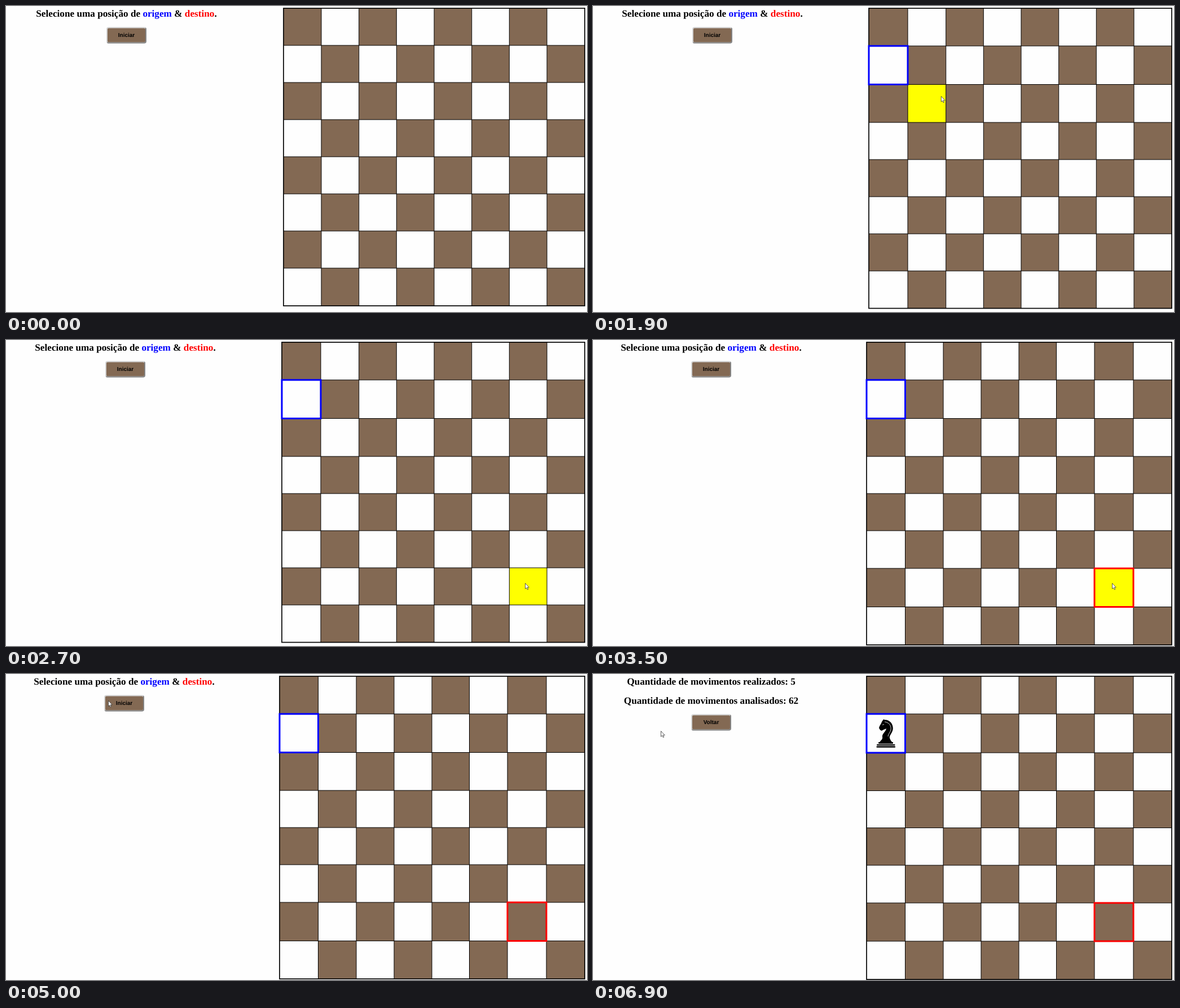
Animation of 1030x544 px, one loop 8 s. Source, as an HTML page:

```html
<!DOCTYPE html>
<html lang="pt">
<head>
<meta charset="utf-8">
<style>
  html, body { margin: 0; width: 100%; height: 100%; overflow: hidden; background: #fefefe; }
  svg { display: block; width: 1030px; height: 544px; }
  .title { font: bold 17.2px "Liberation Serif", "Times New Roman", serif; text-anchor: middle; white-space: pre; }
  .label { font: bold 10px "Liberation Sans", Arial, sans-serif; text-anchor: middle; }
  text { text-rendering: geometricPrecision; }
</style>
</head>
<body>
<svg id="stage" viewBox="0 0 1030 544"></svg>
<script>
const LOOP = 8000, STEP = 100;
const BROWN = '#836953', WHITE = '#fefefe';

// Grid lines of the board; selected cells have thicker borders and push the others.
const right = [625.7, 692.3, 759, 825.7, 892.3, 959, 1026];
const wide = [485, 553.5, 621, 688, 755, 821.5, 889, 958, 1026];
const layouts = [
  { from: 0, cx: 213.5, xs: [492, 559, ...right], ys: [4, 70, 136, 202, 268, 334, 400, 466, 533] },
  { from: 1700, cx: 211.5, xs: [489, 558, ...right], ys: [4, 71, 139.5, 207, 273, 339, 405, 471, 537.5] },
  { from: 3500, cx: 209.5, xs: wide, ys: [4, 71, 139.5, 207, 273, 339, 406, 474.5, 542] },
  { from: 5600, cx: 209.5, xs: wide, ys: [4, 71, 140, 207.5, 273.5, 340, 407, 475, 543] }
];

const linear = k => k;
const easeOut = k => 1 - (1 - k) ** 2;
const smooth = k => k * k * (3 - 2 * k);

// Mouse moves: start time, number of steps, end point, easing.
const start = [13, -11.6];
const moves = [
  [300, 2, 471.5, 114.5, linear],
  [600, 3, 551, 83.5, easeOut],
  [1100, 3, 530.5, 88.5, easeOut],
  [1900, 4, 877.5, 376.5, linear],
  [2300, 5, 920.5, 432.5, easeOut],
  [3800, 3, 415.5, 186.5, easeOut],
  [4400, 7, 181.5, 47.5, smooth],
  [6500, 5, 120.5, 101.5, smooth]
];

function mouseAt(t) {
  let [x, y] = start;
  for (const [from, steps, tx, ty, ease] of moves) {
    if (t < from) break;
    const k = ease(Math.min(1, ((t - from) / STEP + 1) / steps));
    x += (tx - x) * k;
    y += (ty - y) * k;
  }
  return [x, y];
}

const rect = (x, y, w, h, attrs) => `<rect x="${x}" y="${y}" width="${w}" height="${h}" ${attrs}/>`;
const path = (d, attrs) => `<path d="${d}" ${attrs}/>`;
const title = (x, y, s) => `<text class="title" x="${x}" y="${y}">${s}</text>`;

function board({ xs, ys }, mx, my) {
  let cells = '', lines = '';
  for (let r = 0; r < 8; r++) {
    for (let c = 0; c < 8; c++) {
      const x = xs[c], y = ys[r], w = xs[c + 1] - x, h = ys[r + 1] - y;
      const hover = mx >= x && mx < x + w && my >= y && my < y + h;
      cells += rect(x, y, w, h, `fill="${hover ? '#ff0' : (r + c) % 2 ? WHITE : BROWN}"`);
    }
  }
  for (let i = 1; i < 8; i++) {
    lines += `M${xs[i]} ${ys[0]}V${ys[8]}M${xs[0]} ${ys[i]}H${xs[8]}`;
  }
  return cells + path(lines, 'stroke="#000"') +
    rect(xs[0], ys[0], xs[8] - xs[0], ys[8] - ys[0], 'fill="none" stroke="#000" stroke-width="1.7"');
}

function mark({ xs, ys }, c, r, color) {
  return rect(xs[c], ys[r], xs[c + 1] - xs[c], ys[r + 1] - ys[r],
    `fill="none" stroke="${color}" stroke-width="3"`);
}

function button(cx, y, label, pressed) {
  const l = cx - 34.5, r = cx + 34.5, b = y + 27;
  const [lit, dark] = pressed ? ['#858585', '#d2d2d2'] : ['#d2d2d2', '#858585'];
  return rect(l, y, 69, 27, `rx="3" fill="${BROWN}" stroke="${lit}" stroke-width="2"`) +
    path(`M${r - 1} ${y + 1}Q${r} ${y + 1} ${r} ${y + 3}V${b - 3}Q${r} ${b} ${r - 3} ${b}H${l + 3}Q${l + 1} ${b} ${l + 1} ${b - 1}`,
      `fill="none" stroke="${dark}" stroke-width="2"`) +
    `<text class="label" x="${cx}" y="${y + 16}">${label}</text>`;
}

function knight() {
  return path('M508 122C509 118 514 117 513 112C512 106 519 103 520 97C517 99 515 98 512 101L509 99.5L507 96C508 91 511 89 512 85L515 80.5L517 81.5C527 81 533 90 531.5 99C530 106 525 109 526 114Q527 118 531 122Z', '') +
    path('M517 85C525 86 529 92 528 99C527 104 523 107 523 111M513 90.5L516 89.5', `fill="none" stroke="${WHITE}" stroke-width=".8"`) +
    rect(506, 121, 26, 3, 'rx="1"') + rect(503, 125, 32.5, 2.2, 'rx="1"') + rect(502.5, 128.2, 33.5, 2.6, 'rx="1"');
}

function cursor(x, y) {
  return path(`M${x} ${y}v9.8l2.2-1.9 1.6 3.4 1.5-.7-1.6-3.3h3.1z`,
    'fill="#fff" stroke="#333" stroke-width=".8"');
}

function draw(t) {
  const lay = layouts.filter(l => t >= l.from).pop();
  const [mx, my] = mouseAt(t);
  const { cx } = lay;
  let out = board(lay, mx, my);
  if (t >= 1700) out += mark(lay, 0, 1, '#00f');
  if (t >= 3500) out += mark(lay, 6, 6, '#f00');
  if (t < 5600) {
    out += title(cx, 19, 'Selecione uma posição de <tspan fill="#00f">origem</tspan> &amp; <tspan fill="#f00">destino</tspan>.') +
      button(cx, 38.5, 'Iniciar', t >= 5400);
  } else {
    out += title(cx, 19, 'Quantidade de movimentos realizados: 5') +
      title(cx, 53, 'Quantidade de movimentos analisados: 62') +
      button(cx, 72.5, 'Voltar', false);
  }
  if (t >= 5900) out += knight();
  return out + cursor(mx, my);
}

const stage = document.getElementById('stage');
const begin = performance.now();
let shown = -1;

function tick() {
  const t = Math.floor((performance.now() - begin) % LOOP / STEP) * STEP;
  if (t !== shown) stage.innerHTML = draw(shown = t);
  requestAnimationFrame(tick);
}
tick();
</script>
</body>
</html>
```
